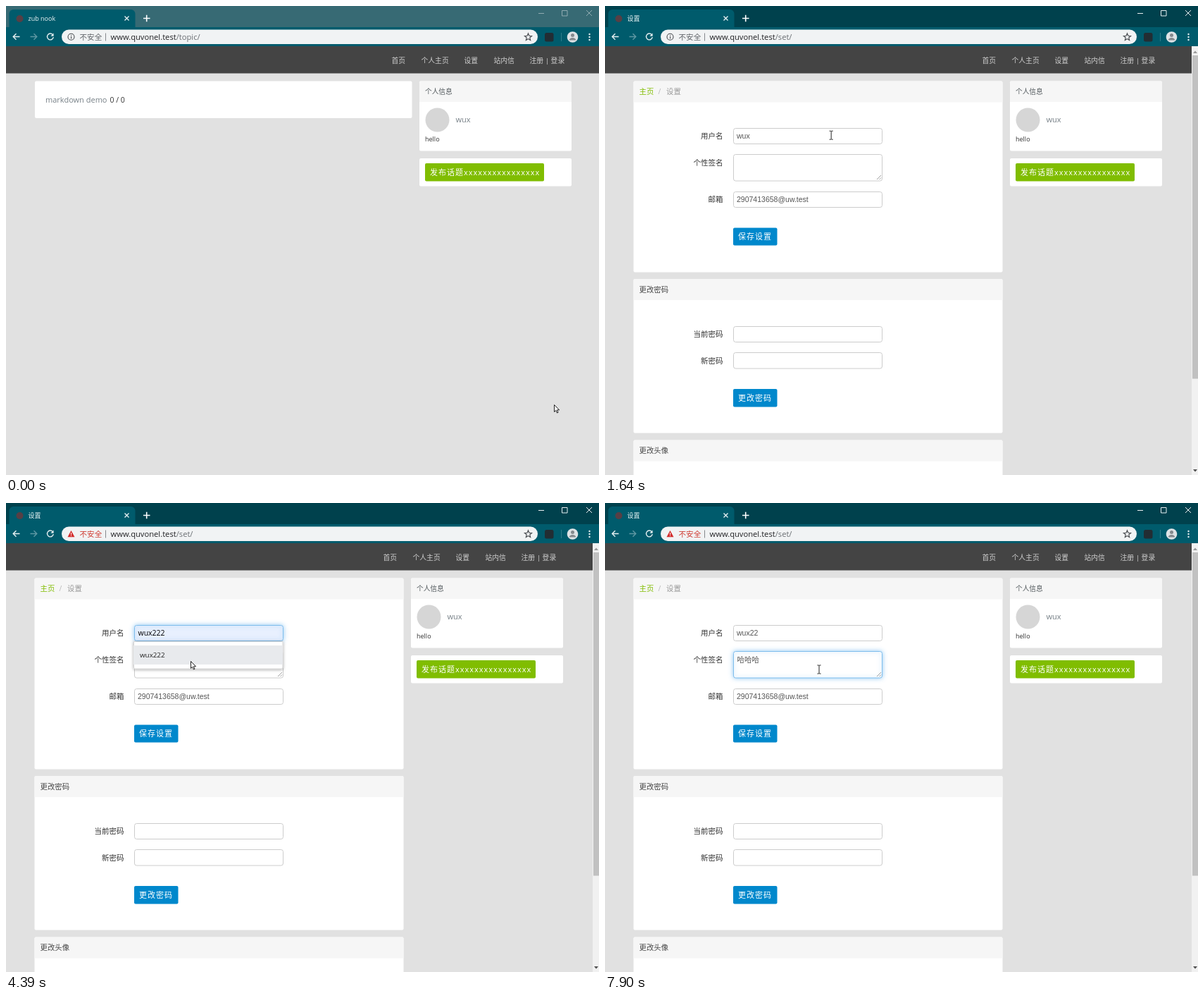
Animation, 842 px wide and 665 px high, one loop 8 s. Source, as an HTML page with a canvas:

```html
<!DOCTYPE html>
<html lang="zh">
<head>
<meta charset="utf-8">
<title>Settings</title>
<style>
html, body { margin: 0; width: 100%; height: 100%; overflow: hidden; background: #e1e1e1; }
canvas { display: block; }
</style>
</head>
<body>
<canvas id="stage" width="842" height="665"></canvas>
<script>
const c = document.getElementById('stage').getContext('2d');
const UI = '"Open Sans", "Noto Sans CJK SC", "Noto Sans CJK", sans-serif';
const FIELD = '"Liberation Sans", "Noto Sans CJK SC", "Noto Sans CJK", sans-serif';
const LOOP = 8000, STEP = LOOP / 73;
const HOST = 'www.quvonel.test', USER = 'wux', FULL = 'wux222';

// time, x, y of the pointer's hot spot
const POINTER = [
  [0, 778, 565], [100, 778, 565], [400, 718, 270], [620, 659, 79], [986, 654, 79],
  [1150, 600, 105], [1500, 380, 178], [1830, 245, 190], [2411, 242, 193],
  [2720, 242, 193], [2960, 250, 220], [3180, 255, 242], [3507, 253, 180],
  [3900, 253, 182], [4384, 262, 224], [4490, 262, 225], [4820, 268, 298],
  [5200, 281, 232], [5590, 281, 229], [6250, 281, 229], [6600, 298, 246],
  [7050, 304, 236], [8000, 304, 236]
];

function pointerAt(t) {
  let i = 1;
  while (i < POINTER.length - 1 && POINTER[i][0] < t) i++;
  const a = POINTER[i - 1], b = POINTER[i];
  const k = (t - a[0]) / (b[0] - a[0]);
  return [a[1] + (b[1] - a[1]) * k, a[2] + (b[2] - a[2]) * k];
}

function text(s, x, y, size, color, font = UI, spacing = 0) {
  c.font = size + 'px ' + font;
  c.letterSpacing = spacing + 'px';
  c.fillStyle = color;
  c.fillText(s, x, y + size * 0.365);
  return c.measureText(s).width;
}

function rect(x, y, w, h, color) {
  c.fillStyle = color;
  c.fillRect(x, y, w, h);
}

function box(x, y, w, h, r, fill, stroke) {
  c.beginPath();
  c.roundRect(x, y, w, h, r);
  if (fill) { c.fillStyle = fill; c.fill(); }
  if (stroke) { c.strokeStyle = stroke; c.lineWidth = 1; c.stroke(); }
}

function disc(x, y, r, color) {
  c.beginPath();
  c.arc(x, y, r, 0, 7);
  c.fillStyle = color;
  c.fill();
}

function line(d, color, width = 1) {
  c.strokeStyle = color;
  c.lineWidth = width;
  c.stroke(new Path2D(d));
}

function shape(d, fill, stroke) {
  const p = new Path2D(d);
  c.fillStyle = fill;
  c.fill(p);
  if (stroke) { c.strokeStyle = stroke; c.lineWidth = 1; c.stroke(p); }
}

function withShadow(color, blur, dy, draw) {
  c.save();
  c.shadowColor = color;
  c.shadowBlur = blur;
  c.shadowOffsetY = dy;
  draw();
  c.restore();
}

function star(x, y, r) {
  c.beginPath();
  for (let i = 0; i < 10; i++) {
    const a = -Math.PI / 2 + i * Math.PI / 5, q = i % 2 ? r * 0.45 : r;
    c.lineTo(x + q * Math.cos(a), y + q * Math.sin(a));
  }
  c.closePath();
  c.strokeStyle = '#4a4d51';
  c.lineWidth = 1.2;
  c.stroke();
}

function browser(s) {
  rect(0, 0, 842, 31, s.active ? '#00414d' : '#376a74');
  box(4.5, 5, 179, 30, [6, 6, 0, 0], '#005b6c');
  rect(0, 30, 842, 27, '#005b6c');
  disc(19.5, 18, 5, '#573f45');
  text(s.settings ? '设置' : 'zub nook', 31.5, 18, 9, '#eef5f6');
  line('M168.5 14.5l6 6m0-6l-6 6', '#e8f1f3', 1.3);
  line('M195 17.5h9.5M199.7 12.8v9.5', '#fff', 1.6);

  const win = s.active ? '#e6eef0' : '#90abb1';
  line('M756 10.5h8M789.5 6.5h7.5v7.5h-7.5zM824 6l8 8m0-8l-8 8', win);

  line('M19.5 43.5h-9M14.5 39.2l-4.3 4.3 4.3 4.3', '#e4eff1', 1.4);
  line('M34.5 43.5h9M39.5 39.2l4.3 4.3-4.3 4.3', '#5f98a3', 1.4);
  line('M66.3 40.6a4.4 4.4 0 1 0 1 3.6', '#e4eff1', 1.4);
  shape('M67.6 38.6v4.2h-4.2z', '#e4eff1');

  box(79, 33.5, 676, 20.5, 10.2, '#f1f3f4');
  const tone = s.danger ? '#cf3a31' : '#5f6368';
  if (s.danger) {
    shape('M92.5 39l5 9.2h-10z', '#d32f2f');
    rect(92, 42.2, 1, 3, '#fff');
    rect(92, 46, 1, 1, '#fff');
  } else {
    c.beginPath();
    c.arc(92.5, 43.8, 4.5, 0, 7);
    c.strokeStyle = '#4a4d51';
    c.lineWidth = 1.1;
    c.stroke();
    rect(92, 43.2, 1.1, 3.2, '#4a4d51');
    rect(92, 41.2, 1.1, 1.1, '#4a4d51');
  }
  text('不安全', 104.5, 43.8, 10.6, tone);
  rect(141, 38.5, 1, 11, '#85898d');
  const w = text(HOST, 148.5, 43.5, 11.2, '#202124');
  text(s.settings ? '/set/' : '/topic/', 148.5 + w, 43.5, 11.2, '#6b6f74');
  star(741.5, 44.2, 5.3);

  box(765, 38, 12.5, 12.5, 2.5, '#222d33');
  rect(788, 38, 1, 12, '#2f7c8a');
  disc(804.5, 44, 7.8, '#dfe3e6');
  disc(804.5, 41.6, 2.5, '#85898d');
  shape('M799.8 48.5a4.7 3.6 0 0 1 9.4 0z', '#85898d');
  for (let y = 40; y < 49; y += 4) disc(828.5, y, 1.2, '#e4eff1');
}

function navbar(dx, hover) {
  rect(0, 57, 842, 38.5, '#444');
  const items = [['首页', 535.5], ['个人主页', 577.5], ['设置', 638.5], ['站内信', 680.5], ['注册 | 登录', 731.5]];
  for (const [label, x] of items)
    text(label, x + dx, 77, 9.8, hover && label === '设置' ? '#fff' : '#d0d0d0');
}

function sidebar(x) {
  box(x, 106.5, 216, 99, 2, '#fff');
  box(x, 106.5, 216, 29.5, [2, 2, 0, 0], '#f6f6f6');
  text('个人信息', x + 8, 121.5, 9.7, '#51585c');
  disc(x + 25.5, 161.5, 17, '#d6d6d6');
  text(USER, x + 51.5, 161, 11, '#778087');
  text('hello', x + 8, 189, 9, '#333');
  box(x, 216, 216, 39.5, 2, '#fff');
  button('发布话题' + 'x'.repeat(16), x + 8, 223, 169, 25.5, '#80bd01');
}

function button(label, x, y, w, h, color) {
  box(x, y, w, h, 2, color);
  text(label, x + 7, y + h / 2, 11, '#fff', UI, 1);
}

function panel(y, h, title) {
  box(40.5, y, 524, h, 2, '#fff');
  box(40.5, y, 524, 30, [2, 2, 0, 0], '#f6f6f6');
  if (title) text(title, 48.5, y + 15, 10.4, '#444');
}

function label(s, y) {
  c.textAlign = 'right';
  text(s, 167.5, y, 10.5, '#333');
  c.textAlign = 'left';
}

function field(y, h, focused, fill = '#fff') {
  const draw = () => box(182.5, y + 0.5, 211, h - 1, 3, fill, focused ? '#7fbdec' : '#ccc');
  if (focused) withShadow('rgba(82,168,236,.6)', 6, 0, draw);
  else draw();
}

function topicPage() {
  box(41, 106.5, 535.5, 52.5, 2, '#fff');
  text('markdown demo', 56, 133, 11, '#778087');
  text('0 / 0', 147.5, 133, 10.5, '#333');
  sidebar(587);
}

function settingsPage(s) {
  panel(106.5, 271);
  text('主页', 48.5, 121.5, 10.4, '#80bd01');
  text('/', 75.5, 121.5, 10.4, '#bbb');
  text('设置', 87, 121.5, 10.4, '#999');

  label('用户名', 184.5);
  label('个性签名', 222.5);
  label('邮箱', 274);
  field(173, 23, s.nameFocus, s.row >= 0 ? '#e8f0fe' : '#fff');
  if (s.row >= 0) text(s.options[s.row], 187.5, 184.5, 10.5, '#000');
  else text(s.name, 187, 184, 10.5, '#555', FIELD);

  field(210, 38.5, s.bioFocus);
  line('M386 246l6-6M389.5 246l2.5-2.5', '#888', 0.8);
  const bioWidth = s.bio ? text(s.bio, 187.5, 222, 10.5, '#555', FIELD) : 0;
  if (s.composing) rect(187.5, 227.5, bioWidth, 1, '#555');
  if (s.caret) rect(187 + bioWidth, 215.5, 1, 12.5, '#333');

  field(263, 23);
  text('2907413658@uw.test', 187, 274, 10.5, '#555', FIELD);
  button('保存设置', 182, 314.5, 62.5, 25, '#0088cc');

  panel(387, 218.5, '更改密码');
  label('当前密码', 465.5);
  label('新密码', 503);
  field(454, 23);
  field(491, 23.5);
  button('更改密码', 182, 543, 62.5, 25.5, '#0088cc');

  panel(615.5, 60, '更改头像');
  sidebar(575);

  if (s.options.length) {
    const h = 12.5 + 27 * s.options.length;
    withShadow('rgba(0,0,0,.35)', 4, 1, () => box(181, 196, 212.5, h, [0, 0, 2, 2], '#fff'));
    box(181.5, 196.5, 211.5, h - 1, [0, 0, 2, 2], null, '#d4d4d4');
    s.options.forEach((o, i) => {
      if (i === s.row) rect(181, 202 + 27 * i, 212, 27, '#e8eaed');
      text(o, 190, 215.3 + 27 * i, 9.8, '#222');
    });
  }

  rect(833, 57, 9, 608, '#f1f1f1');
  rect(834, 70, 8, 458.5, '#c1c1c1');
  shape('M835 67h6l-3-3.5z', '#9a9a9a');
  shape('M835 657h6l-3 3.5z', '#505050');
}

function pointer(kind, x, y) {
  c.save();
  c.translate(x, y);
  if (kind === 'beam') {
    line('M-2.5-6h2l.5.5.5-.5h2M0-5.5v11M-2.5 6h2l.5-.5.5.5h2', '#222', 1);
  } else if (kind === 'hand') {
    shape('M-1.2 0.5q1.2-1.4 2.4 0v4.5l4.6 1q1 .4.8 2l-.8 4.5h-6l-4.3-5q.7-1.6 2.3-.4l1 .9z', '#fff', '#222');
  } else {
    shape('M.5.5v10l2.3-2.1 1.6 3.6 1.6-.7-1.6-3.5h3.2z', '#fff', '#222');
  }
  c.restore();
}

function stateAt(t) {
  const [x, y] = pointerAt(t);
  const s = {
    x, y,
    active: t >= 740,
    settings: t >= 960,
    danger: t >= 3650,
    nameFocus: t >= 1950 && t < 5250,
    bioFocus: t >= 5250,
    name: USER + (t >= 3950 ? '22' : t >= 3650 ? '2' : ''),
    options: [], row: -1, bio: '', composing: false, caret: false
  };
  if (t >= 2050 && t < 3650) s.options = [USER, FULL];
  else if (t >= 3650 && t < 4700) s.options = [FULL];

  const inX = x > 181 && x < 394;
  const row = Math.floor((y - 202) / 27);
  if (inX && row >= 0 && row < s.options.length) s.row = row;

  if (t >= 7290) s.bio = '哈哈哈';
  else if (t >= 6600) {
    s.bio = 'hahaha'.slice(0, 1 + Math.floor((t - 6600) / STEP));
    s.composing = true;
  }
  const since = t - (t >= 7290 ? 7290 : 5250);
  s.caret = s.bioFocus && (s.composing || since % 1060 < 530);

  s.link = y < 90 && x > 636 && x < 672;
  const within = (a, b) => y >= a && y <= b;
  const overField = s.settings && inX &&
    (within(173, 196) || within(263, 286) || (!s.options.length && within(210, 248)));
  s.kind = s.link ? 'hand' : overField ? 'beam' : 'arrow';
  return s;
}

function render(t) {
  const s = stateAt(t);
  rect(0, 0, 842, 665, '#e1e1e1');
  navbar(s.settings ? 0 : 12, s.link);
  if (s.settings) settingsPage(s);
  else topicPage();
  browser(s);
  if (t >= 600 && t < 1180) {
    box(0, 649, 104, 16, [0, 3, 0, 0], '#005b6c');
    text(HOST + '/set/', 1, 657, 9.4, '#c9dde1');
  }
  pointer(s.kind, s.x, s.y);
}

function tick(now) {
  const i = Math.min(72, Math.floor((now % LOOP + 24) / STEP));
  render(i * STEP);
  requestAnimationFrame(tick);
}

const start = performance.now();
render(0);
requestAnimationFrame(function loop() {
  tick.start = start;
  tick(Math.max(0, performance.now() - start));
});
</script>
</body>
</html>
```
